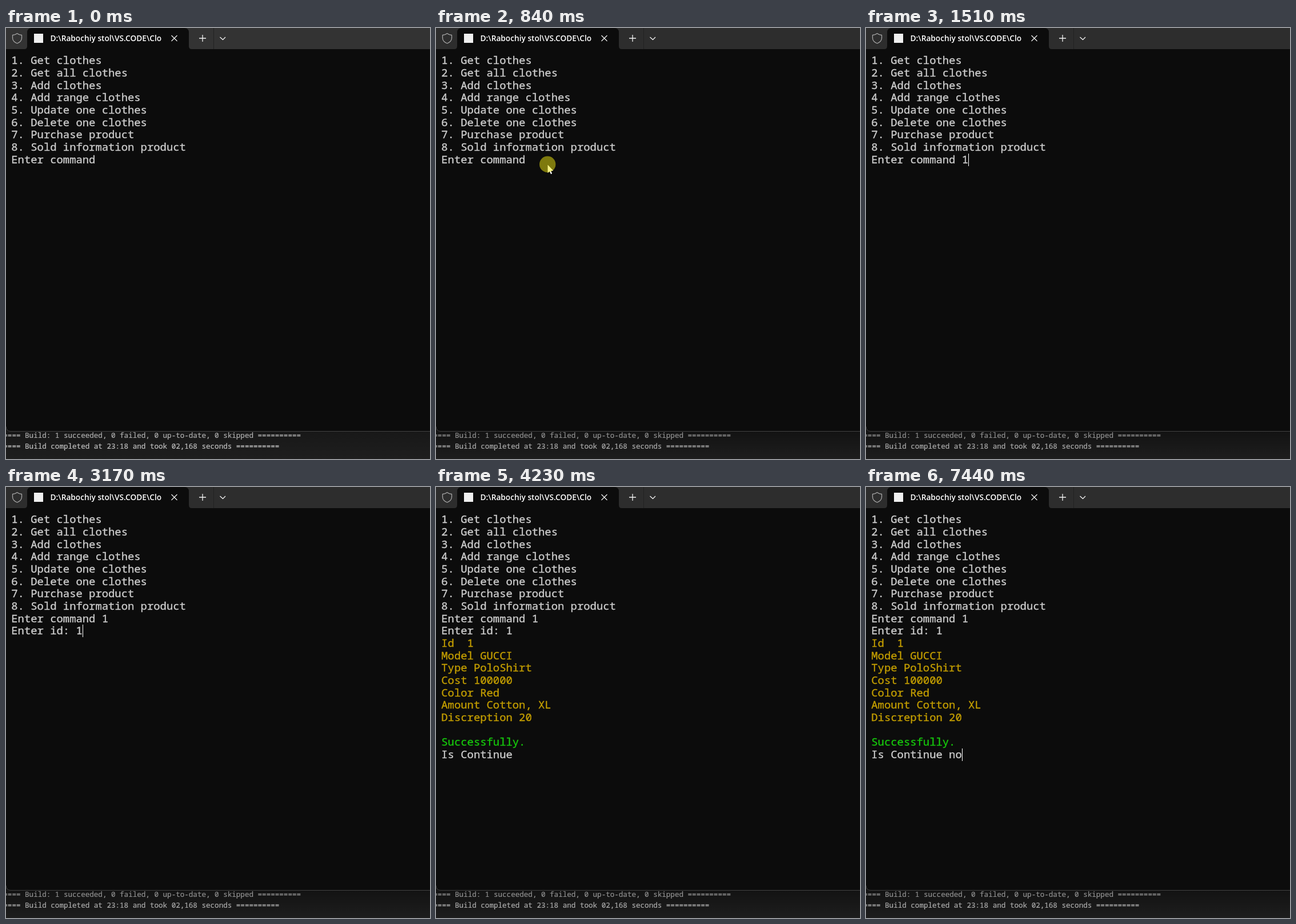
Animation, 742 px wide and 755 px high, one loop 8 s. Source, as an HTML page with a canvas:

```html
<!DOCTYPE html>
<html lang="en">
<head>
<meta charset="utf-8">
<title>Terminal session</title>
<style>
  html, body { margin: 0; width: 100%; height: 100%; overflow: hidden; background: #0c0c0c; }
  canvas { display: block; width: 742px; height: 755px; }
</style>
</head>
<body>
<canvas id="stage" width="742" height="755"></canvas>
<script>
const W = 742, H = 755, LOOP = 8000;
const ctx = document.getElementById('stage').getContext('2d');

const MONO = '"Noto Sans Mono", "DejaVu Sans Mono", monospace';
const UI = '"Open Sans", "Noto Sans", sans-serif';
const BG = '#0c0c0c', GREY = '#cccccc', GOLD = '#c19c00', GREEN = '#16c60c';

// Terminal grid
const LEFT = 9.3, TOP = 46.2, COL = 11.33, ROW = 21.67, BASE = 17.2;

const menu = [
  '1. Get clothes',
  '2. Get all clothes',
  '3. Add clothes',
  '4. Add range clothes',
  '5. Update one clothes',
  '6. Delete one clothes',
  '7. Purchase product',
  '8. Sold information product'
];
const details = [
  'Id  1',
  'Model GUCCI',
  'Type PoloShirt',
  'Cost 100000',
  'Color Red',
  'Amount Cotton, XL',
  'Discreption 20'
];

// Caret states: [start ms, column, row]; a null column hides it
const caretSteps = [
  [0, null], [1040, 14, 8], [1510, 15, 8], [2110, 10, 9], [2770, null],
  [3170, 11, 9], [3500, 12, 19], [4230, null], [4770, 12, 19],
  [5300, null], [5840, 12, 19], [7110, 13, 19], [7440, 14, 19]
];

const CLICK = 840, RELEASE = 980;

// A thin outline in the same colour gives the heavier stems of the console face
function text(str, x, y, font, color, extra = 0) {
  ctx.font = font;
  ctx.fillStyle = color;
  ctx.fillText(str, x, y);
  if (extra) {
    ctx.strokeStyle = color;
    ctx.lineWidth = extra;
    ctx.lineJoin = 'round';
    ctx.strokeText(str, x, y);
  }
}

function line(row, str, color = GREY) {
  text(str, LEFT, Math.round(TOP + row * ROW + BASE), `18.88px ${MONO}`, color, 0.4);
}

function stroke(color, width, ...paths) {
  ctx.strokeStyle = color;
  ctx.lineWidth = width;
  ctx.beginPath();
  for (const path of paths) {
    path.forEach(([x, y], i) => i ? ctx.lineTo(x, y) : ctx.moveTo(x, y));
  }
  ctx.stroke();
}

function drawOutputPanel(active) {
  ctx.fillStyle = '#1f1f1f';
  ctx.fillRect(0, 690, W, H - 690);
  const font = `12.58px ${MONO}`;
  const bar = '='.repeat(10);
  text(`==== Build: 1 succeeded, 0 failed, 0 up-to-date, 0 skipped ${bar}`, -4.7, 718, font, '#dadada', 0.2);
  text(`==== Build completed at 23:18 and took 02,168 seconds ${bar}`, -4.7, 737, font, '#dadada', 0.2);
  const shade = ctx.createLinearGradient(0, 706, 0, H);
  shade.addColorStop(0, `rgba(0,0,0,${active ? 0.4 : 0.24})`);
  shade.addColorStop(1, `rgba(0,0,0,${active ? 0.06 : 0.02})`);
  ctx.fillStyle = shade;
  ctx.fillRect(0, 690, W, H - 690);
}

function drawWindow(active) {
  ctx.beginPath();
  ctx.moveTo(0, 0);
  ctx.lineTo(W, 0);
  ctx.lineTo(W, 706);
  ctx.lineTo(8, 706);
  ctx.quadraticCurveTo(0.5, 706, 0, 698);
  ctx.closePath();
  ctx.fillStyle = BG;
  ctx.fill();

  ctx.beginPath();
  ctx.moveTo(0, 698);
  ctx.quadraticCurveTo(0.5, 706.5, 8, 706.5);
  ctx.lineTo(W, 706.5);
  ctx.strokeStyle = '#424242';
  ctx.lineWidth = 1;
  ctx.stroke();

  ctx.fillStyle = active ? '#2d2d2d' : '#333333';
  ctx.fillRect(0, 0, W, 37);
}

function drawTab() {
  ctx.beginPath();
  ctx.moveTo(32, 37);
  ctx.quadraticCurveTo(37, 37, 37, 32);
  ctx.lineTo(37, 8);
  ctx.quadraticCurveTo(37, 0, 45, 0);
  ctx.lineTo(312, 0);
  ctx.quadraticCurveTo(320, 0, 320, 8);
  ctx.lineTo(320, 32);
  ctx.quadraticCurveTo(320, 37, 325, 37);
  ctx.closePath();
  ctx.fillStyle = BG;
  ctx.fill();

  ctx.fillStyle = '#f0f0f0';
  ctx.fillRect(49, 10, 16, 16);

  ctx.save();
  ctx.beginPath();
  ctx.rect(76, 4, 196, 30);
  ctx.clip();
  text('D:\\Rabochiy stol\\VS.CODE\\Clothes', 77.5, 23, `600 13.7px ${UI}`, '#ffffff');
  ctx.restore();

  stroke('#f2f2f2', 1.2, [[289.5, 13], [299.5, 23]], [[299.5, 13], [289.5, 23]]);
  stroke('#f2f2f2', 1.3, [[338, 18], [350, 18]], [[344, 12], [344, 24]]);
  stroke('#222222', 1, [[363.5, 0], [363.5, 37]]);
  stroke('#f2f2f2', 1.3, [[374.5, 16], [379.5, 20.5], [384, 16]]);
}

function drawShield() {
  ctx.beginPath();
  ctx.moveTo(19.5, 9.5);
  ctx.quadraticCurveTo(23, 12.3, 27.5, 12.5);
  ctx.lineTo(27.5, 18);
  ctx.quadraticCurveTo(27, 24, 19.5, 27);
  ctx.quadraticCurveTo(12, 24, 11.5, 18);
  ctx.lineTo(11.5, 12.5);
  ctx.quadraticCurveTo(16, 12.3, 19.5, 9.5);
  ctx.closePath();
  ctx.strokeStyle = '#a6a6a6';
  ctx.lineWidth = 1.3;
  ctx.stroke();
}

function drawConsole(t) {
  menu.forEach((item, i) => line(i, item));
  line(8, 'Enter command ' + (t >= 1510 ? '1' : ''));
  if (t >= 2110) line(9, 'Enter id: ' + (t >= 3170 ? '1' : ''));
  if (t >= 3500) {
    details.forEach((item, i) => line(10 + i, item, GOLD));
    line(18, 'Successfully.', GREEN);
    line(19, 'Is Continue ' + (t >= 7440 ? 'no' : t >= 7110 ? 'n' : ''));
  }
}

function drawCaret(t) {
  const [, col, row] = caretSteps.filter(s => s[0] <= t).pop();
  if (col == null) return;
  ctx.fillStyle = '#ffffff';
  ctx.fillRect(Math.round(LEFT + col * COL), Math.round(TOP + row * ROW), 1, 22);
}

const mix = (a, b, k) => a + (b - a) * k;

function pointerAt(t) {
  const step = Math.floor((t - 100) / (200 / 3));
  if (step <= 6) {
    const k = 1 - (1 - step / 6) ** 2;
    return [mix(663, 200, k), mix(730, 292, k)];
  }
  const u = Math.min(1, (step - 6) / 5);
  const k = u * u * (3 - 2 * u);
  return [mix(200, 195, k), mix(292, 239, k)];
}

function drawPointer(t) {
  if (t < 110 || t >= 1510) return;
  const [x, y] = pointerAt(t);
  ctx.save();
  ctx.translate(x, y);
  ctx.beginPath();
  ctx.moveTo(0.5, 0.5);
  ctx.lineTo(0.5, 15);
  ctx.lineTo(3.8, 12);
  ctx.lineTo(6, 17);
  ctx.lineTo(8.2, 16);
  ctx.lineTo(6, 11.2);
  ctx.lineTo(10.4, 11);
  ctx.closePath();
  ctx.strokeStyle = '#000000';
  ctx.lineWidth = 1.4;
  ctx.stroke();
  ctx.fillStyle = '#ffffff';
  ctx.fill();
  ctx.restore();

  if (t >= CLICK && t < RELEASE) {
    ctx.beginPath();
    ctx.arc(195.2, 238.8, 14.2, 0, Math.PI * 2);
    ctx.fillStyle = 'rgba(240,232,16,0.5)';
    ctx.fill();
  }
}

function draw(t) {
  const active = t >= CLICK;
  drawOutputPanel(active);
  drawWindow(active);
  drawTab();
  drawShield();
  drawConsole(t);
  drawCaret(t);
  drawPointer(t);
}

const start = performance.now();
function tick() {
  draw((performance.now() - start) % LOOP);
  requestAnimationFrame(tick);
}
tick();
</script>
</body>
</html>
```
